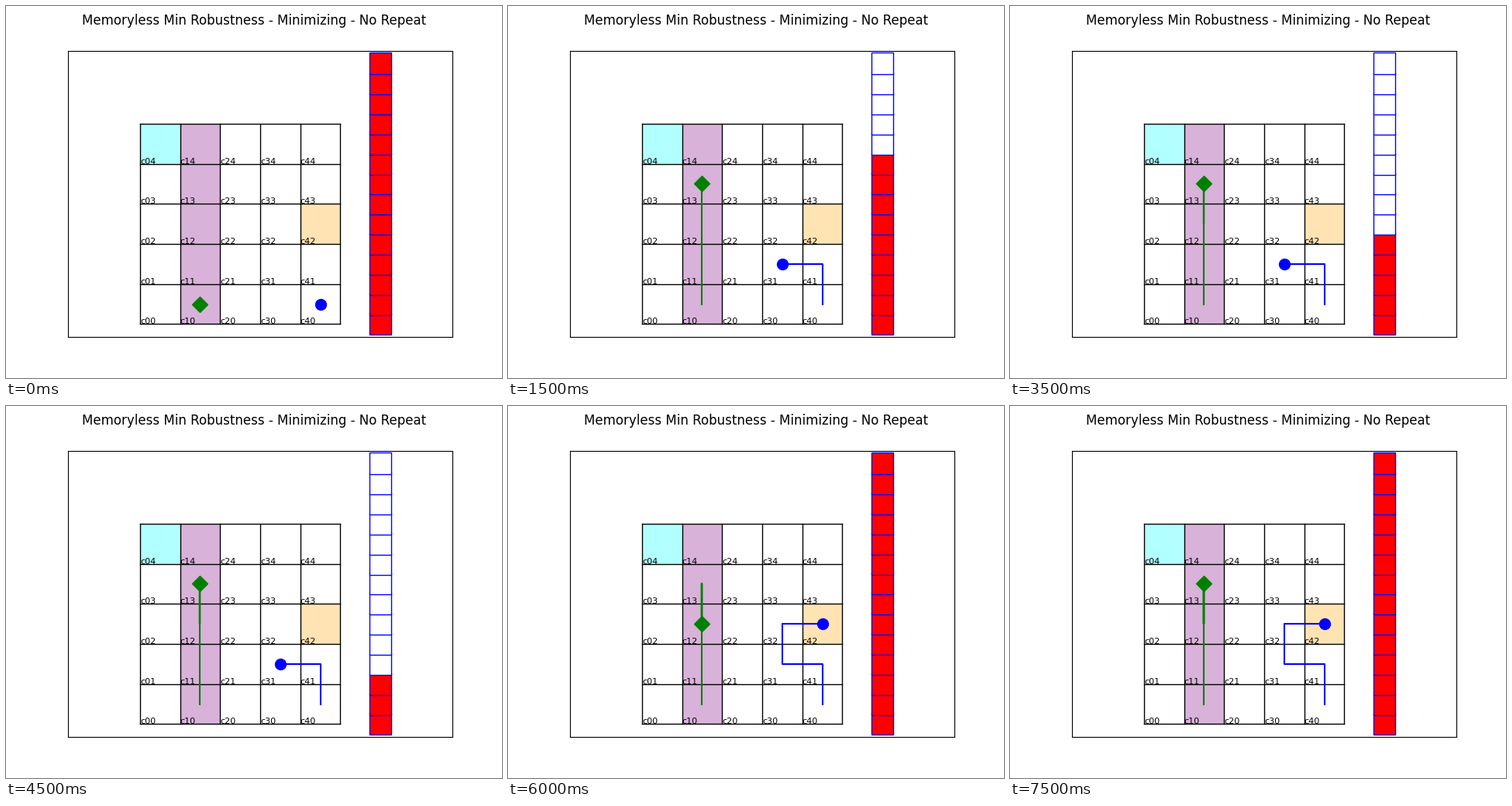
A matplotlib script that plays this animation: 640 by 480 pixels, repeating every 8000 ms.

```python
import matplotlib.pyplot as plt
from matplotlib.animation import FuncAnimation
from matplotlib.patches import Rectangle

SIZE = 5
CELLS = 14
STEPS = 16
STEP_MS = 500
CHARGER = (4, 2)

# Steps at which the blue agent enters a new cell
BLUE_MOVES = {0: (4, 0), 1: (4, 1), 2: (3, 1), 10: (3, 2), 12: CHARGER}


def green_cell(t):
    """Climb to row 3, then bounce between rows 3 and 2."""
    return 1, t if t < 3 else 3 - (t - 3) % 2


def blue_cell(t):
    return BLUE_MOVES[max(s for s in BLUE_MOVES if s <= t)]


def battery(t):
    """Moving costs two units, waiting one; the charger refills."""
    level = CELLS
    for s in range(1, t + 1):
        if blue_cell(s) == CHARGER:
            level = CELLS
        else:
            level -= 2 if blue_cell(s) != blue_cell(s - 1) else 1
    return level


def centers(cell_at, t):
    cells = [cell_at(s) for s in range(t + 1)]
    return [x + 0.5 for x, _ in cells], [y + 0.5 for _, y in cells]


fig = plt.figure(figsize=(6.4, 4.8), dpi=100)
fig.suptitle("Memoryless Min Robustness - Minimizing - No Repeat", fontsize=12)
ax = fig.add_axes([0.125, 0.11, 0.775, 0.77])
ax.set_xticks([])
ax.set_yticks([])

# Same scale on both axes, with a 5% margin in height
y_low, y_high = -0.325, 6.825
half = (y_high - y_low) * 496 / 369.6 / 2
ax.set_xlim(3 - half, 3 + half)
ax.set_ylim(y_low, y_high)

regions = [(0, 4, 1, "cyan"), (1, 0, SIZE, "purple"), (*CHARGER, 1, "orange")]
for x, y, height, color in regions:
    ax.add_patch(Rectangle((x, y), 1, height, fc=color, alpha=0.3, lw=0))

for k in range(SIZE + 1):
    ax.plot([0, SIZE], [k, k], "k", lw=1)
    ax.plot([k, k], [0, SIZE], "k", lw=1)

for i in range(SIZE):
    for j in range(SIZE):
        ax.text(i, j, f"c{i}{j}", fontsize=8)

gauge = [
    ax.plot(6, k / 2, "s", ms=20, mec="b", mfc="r")[0] for k in range(CELLS)
]

agents = []
for cell_at, color, shape in [(green_cell, "g", "D"), (blue_cell, "b", "o")]:
    trail, = ax.plot([], [], color=color, lw=1.5)
    marker, = ax.plot([], [], color=color, marker=shape, ms=10)
    agents.append((cell_at, trail, marker))


def update(t):
    for cell_at, trail, marker in agents:
        xs, ys = centers(cell_at, t)
        trail.set_data(xs, ys)
        marker.set_data(xs[-1:], ys[-1:])
    level = battery(t)
    for k, unit in enumerate(gauge):
        unit.set_markerfacecolor("r" if k < level else "w")
    return [artist for _, *pair in agents for artist in pair] + gauge


anim = FuncAnimation(fig, update, frames=STEPS, interval=STEP_MS,
                     repeat=True, repeat_delay=0)
plt.show()
```
